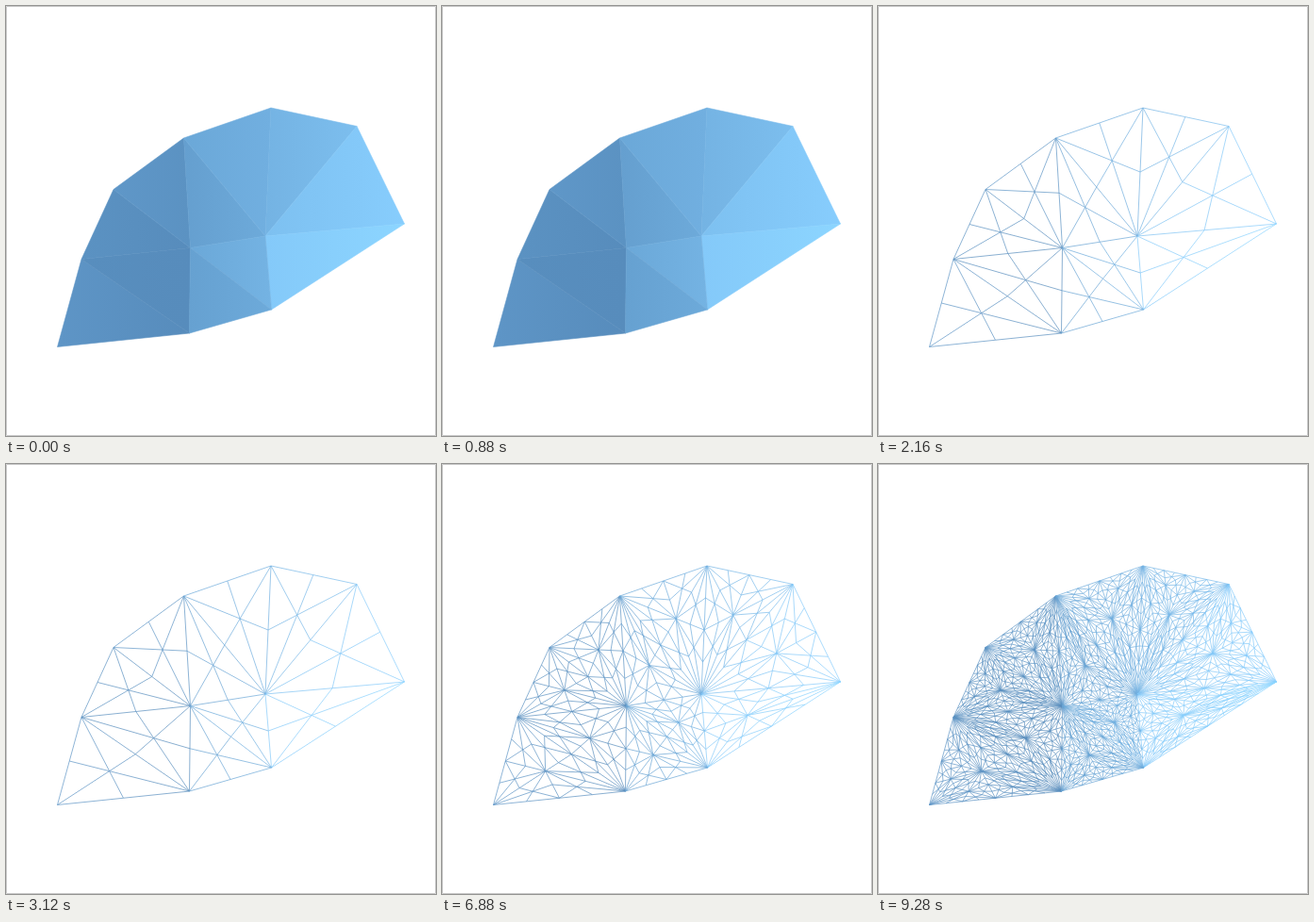
Recreate the animation shown at these times as an HTML page with a canvas. Size 456 by 456 pixels, loop 9.36 s.

```html
<!DOCTYPE html>
<html>
<head>
<meta charset="utf-8">
<style>
  html, body { margin: 0; width: 100%; height: 100%; overflow: hidden; background: #fff; }
  canvas { display: block; }
</style>
</head>
<body>
<canvas id="stage" width="456" height="456"></canvas>
<script>
const ctx = document.getElementById('stage').getContext('2d');
const LOOP = 9360;
const WIRE_STARTS = [960, 1520, 3840, 7200]; // one start time per subdivision level

// x, y and perspective weight, stored as homogeneous coordinates
const point = (x, y, w = 1) => [x * w, y * w, w];
const A = point(54.5, 361.5), B = point(80, 268.5), C = point(114, 194.5),
      D = point(188.5, 140), E = point(281, 108), F = point(372, 127.5, .97),
      G = point(422.5, 231, .93), H = point(281.5, 322), I = point(194.5, 347),
      J = point(195.5, 256.5), K = point(275, 244);

const average = (...pts) => [0, 1, 2].map(i => pts.reduce((sum, p) => sum + p[i], 0) / pts.length);
const flatten = ([x, y, w]) => [x / w, y / w];
const shade = t => `rgb(${136 * t},${21 + 186 * t},${70 + 185 * t})`;

// barycentric subdivision: one triangle becomes six
function split(tri) {
  const center = average(...tri);
  return tri.flatMap((p, i) => {
    const q = tri[(i + 1) % 3], mid = average(p, q);
    return [[p, mid, center], [mid, q, center]];
  });
}

// every edge goes into the path once, even when two triangles share it
function edgePath(triangles, seen) {
  const path = new Path2D();
  for (const tri of triangles) tri.forEach((p, i) => {
    const q = tri[(i + 1) % 3];
    const key = [p, q].map(String).sort().join();
    if (seen.has(key)) return;
    seen.add(key);
    path.moveTo(...flatten(p));
    path.lineTo(...flatten(q));
  });
  return path;
}

function makeFace(tri, left, right) {
  const corners = tri.map(flatten), xs = corners.map(c => c[0]);
  const color = ctx.createLinearGradient(Math.min(...xs), 0, Math.max(...xs), 0);
  color.addColorStop(0, shade(left));
  color.addColorStop(1, shade(right));
  const outline = new Path2D();
  corners.forEach(c => outline.lineTo(...c));
  outline.closePath();
  return { color, outline, triangles: [tri] };
}

// triangle corners, then brightness at its left and right ends
const faces = [
  [[A, B, I], .69, .64], [[B, J, I], .65, .64], [[B, C, J], .67, .64],
  [[C, D, J], .70, .67], [[D, J, K], .74, .80], [[D, E, K], .79, .83],
  [[E, F, K], .85, .91], [[F, G, K], .92, .99], [[G, H, K], .97, 1.03],
  [[J, K, H], .79, .85], [[J, H, I], .75, .80]
].map(args => makeFace(...args));

const wires = WIRE_STARTS.map(() => {
  const seen = new Set();
  return faces.map(face => {
    const path = edgePath(face.triangles, seen);
    face.triangles = face.triangles.flatMap(split);
    return path;
  });
});

function drawSolid() {
  ctx.lineWidth = .6;
  for (const { color, outline } of faces) {
    ctx.fillStyle = ctx.strokeStyle = color;
    ctx.fill(outline);
    ctx.stroke(outline);
  }
}

function drawWire(level) {
  ctx.lineWidth = .7;
  faces.forEach(({ color }, i) => {
    ctx.strokeStyle = color;
    ctx.stroke(wires[level][i]);
  });
}

function frame() {
  const time = performance.now() % LOOP;
  const level = WIRE_STARTS.filter(start => time >= start).length - 1;
  ctx.fillStyle = '#fff';
  ctx.fillRect(0, 0, 456, 456);
  ctx.lineJoin = 'bevel';
  if (level < 0) drawSolid();
  else drawWire(level);
  ctx.lineWidth = 1;
  ctx.strokeStyle = '#c8c8c8';
  ctx.strokeRect(.5, .5, 455, 455);
  requestAnimationFrame(frame);
}
frame();
</script>
</body>
</html>
```
